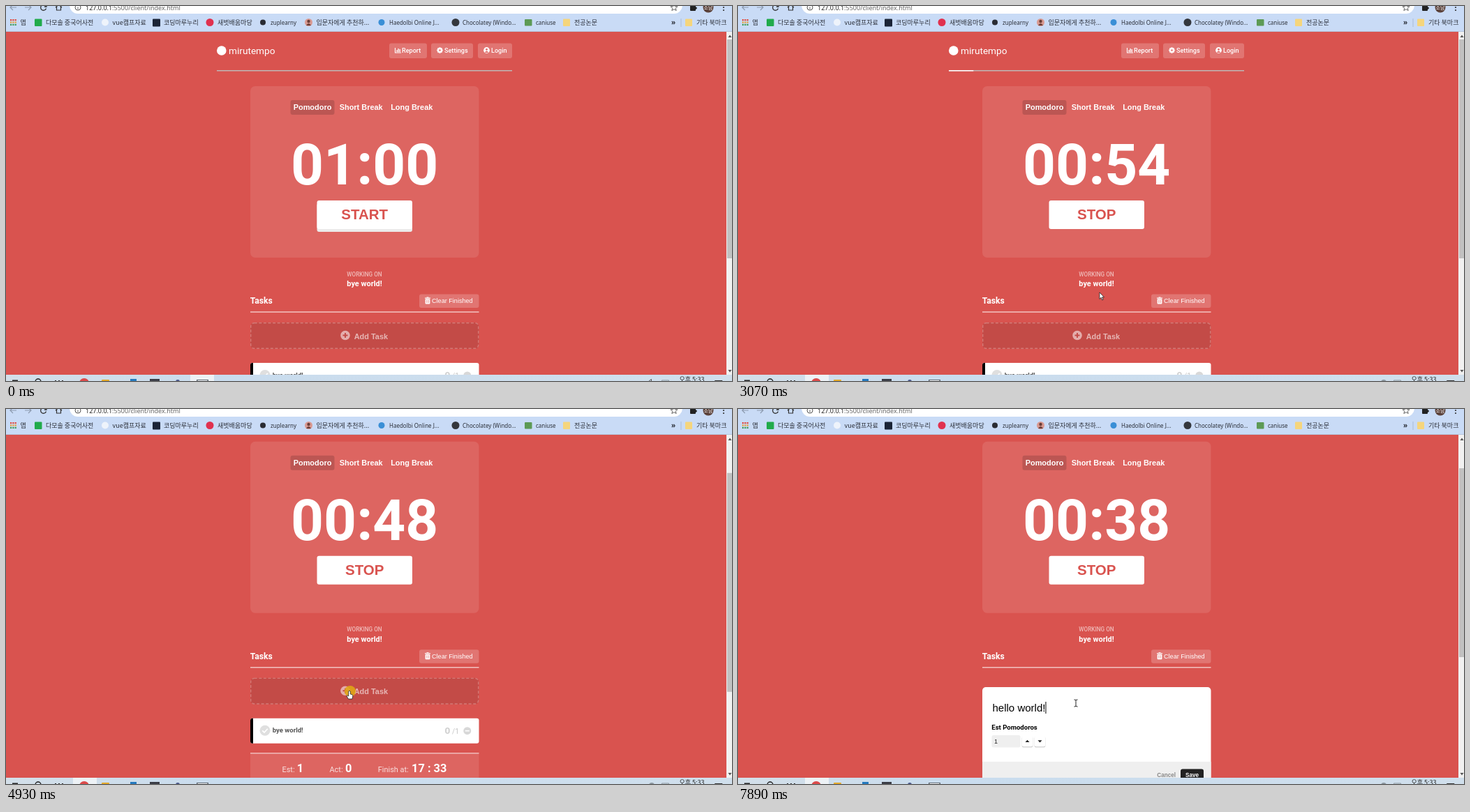
An HTML page with a canvas for the animation above (8000 ms loop, 1040x538 px).

```html
<!DOCTYPE html>
<html lang="ko">
<head>
<meta charset="utf-8">
<title>Pomodoro timer</title>
<style>
html, body { margin: 0; width: 100%; height: 100%; overflow: hidden; }
canvas { display: block; }
</style>
</head>
<body>
<canvas id="stage" width="1040" height="538"></canvas>
<script>
const ctx = document.getElementById('stage').getContext('2d');
const LOOP = 8000, RED = '#d9534f', SCROLL_END = 68.3;
const ROBOTO = 'Roboto, sans-serif', ARIAL = '"Liberation Sans", Arial, sans-serif';
const NOTO = '"Noto Sans", sans-serif', CJK = '"Noto Sans CJK KR", "Noto Sans CJK", sans-serif';
const white = a => `rgba(255,255,255,${a})`;

// Keys are [time, value, ...]; values are joined by straight lines.
const ELAPSED = [[1250, 0], [2190, 3], [3620, 8], [4590, 11], [7880, 22], [8180, 23]];
const SCROLL = [[3660, 0], [3690, 1], [3770, 26], [3860, 52.5], [3930, 63], [4020, SCROLL_END]];
const POINTER = [
  [200, 868, 483], [350, 760, 425], [520, 610, 345], [680, 525, 303], [800, 501, 294],
  [1430, 501, 294], [1660, 618.5, 329], [2380, 618.5, 329], [2560, 641, 375], [2800, 606, 422],
  [3050, 520, 412], [3220, 503, 403], [3690, 503, 403], [3860, 508.5, 397], [4100, 508.5, 397],
  [4370, 492, 404], [5200, 492, 404], [5500, 484, 424], [5790, 484, 424], [5900, 484, 422]
];
const KEYS = 'hello word\bld!';
const KEY_TIMES = [5870, 6110, 6190, 6340, 6490, 6570, 6650, 6800, 6970, 7120, 7290, 7600, 7660, 7880];

const ARROW = new Path2D('M0 0V9.5L2.2 7.4L3.8 11L5.3 10.3L3.7 6.9H6.6Z');
const HAND = new Path2D('M-1.3 1Q0-.8 1.3 1V5L4 5.8Q5 6 4.8 8L4 12H-1.5L-4.2 7.5Q-3.6 6-1.3 8Z');
const BEAM = new Path2D('M-2.5-5Q0-5 0-4Q0-5 2.5-5M0-4.5V4.5M-2.5 5Q0 5 0 4Q0 5 2.5 5');

const clamp = x => Math.max(0, Math.min(1, x));
const within = (t, a, b) => t >= a && t < b;

function track(t, keys) {
  const next = keys.findIndex(k => k[0] > t);
  if (next === 0) return keys[0].slice(1);
  if (next < 0) return keys[keys.length - 1].slice(1);
  const a = keys[next - 1], b = keys[next], p = (t - a[0]) / (b[0] - a[0]);
  return a.slice(1).map((v, i) => v + (b[i + 1] - v) * p);
}

function box(x, y, w, h, color, r = 0) {
  ctx.fillStyle = color;
  ctx.beginPath();
  ctx.roundRect(x, y, w, h, r);
  ctx.fill();
}
function dot(x, y, r, color) {
  ctx.fillStyle = color;
  ctx.beginPath();
  ctx.arc(x, y, r, 0, 7);
  ctx.fill();
}
function line(path, color, width = 1) {
  ctx.strokeStyle = color;
  ctx.lineWidth = width;
  ctx.stroke(new Path2D(path));
}
function shape(path, color) {
  ctx.fillStyle = color;
  ctx.fill(new Path2D(path));
}
function text(str, x, y, font, color = '#fff', align = 'left') {
  ctx.font = font;
  ctx.fillStyle = color;
  ctx.textAlign = align;
  ctx.fillText(str, x, y);
}

function drawBrowser() {
  box(0, 0, 1040, 37, '#c9dbf6');
  box(91, -14, 878, 25, '#fff', 12);
  box(0, 36, 1040, 1, '#b5c4dc');
  line('M15 2H6M10 -2L6 2L10 6', '#8d9bb0', 1.2);
  line('M27 2H36M32 -2L36 2L32 6', '#8d9bb0', 1.2);
  line('M57 0A4 4 0 1 0 57.5 3.5M58 -2V1H55', '#333', 1.3);
  line('M71 2L75.500 -2L80 2M72.500 1V6H78.500V1', '#333', 1.2);
  line('M99 2A4 4 0 1 0 107 2A4 4 0 1 0 99 2M103 1.500V4.500', '#555');
  text('127.0.0.1', 114, 5.5, '9px ' + NOTO, '#222');
  const host = ctx.measureText('127.0.0.1').width;
  text(':5500/client/index.html', 114 + host, 5.5, '9px ' + NOTO, '#666');
  line('M957 -3L958.300 .6L962 .8L959.200 3.100L960.200 6.500L957 4.600L953.800 6.500L954.800 3.100L952 .8L955.700 .6Z', '#555', .9);
  box(980, -1, 8, 8, '#222', 1);
  dot(984, -1, 1.8, '#222');
  dot(988, 3, 1.8, '#222');
  dot(1006, 2, 7.5, '#5c433c');
  text('소담', 1006, 5, '7px ' + CJK, '#fff', 'center');
  [-2, 2, 6].forEach(y => dot(1028, y, 1.1, '#333'));

  ['#e04a3f', '#e8a13a', '#3f9d5a'].forEach((c, i) =>
    [6, 9.3, 12.600].forEach(x => box(x, 19 + i * 3.4, 2.2, 2.2, c)));
  box(41, 18.5, 10.5, 10.5, '#21ab4b', 1);
  dot(142, 23.5, 5, '#eef3fb');
  box(210, 18.5, 11, 11, '#1b2436', 1);
  dot(292, 23.5, 5.5, '#e0314f');
  dot(368, 23.5, 4, '#2a2c33');
  dot(433.500, 23.5, 5.500, '#d99a92');
  dot(433.5, 22, 2.2, '#6b3e38');
  shape('M430 28Q433.500 22 437 28Z', '#6b3e38');
  dot(538, 23.5, 4.500, '#3a8fd6');
  dot(644, 23.5, 5.5, '#34373d');
  box(743, 19, 10.5, 9.500, '#5d9a55', 1);
  [798, 973].forEach(x => box(x, 18.5, 10, 10.5, '#f5d57c', 1));

  const korean = '9px ' + CJK, latin = '8px ' + NOTO, ink = '#2b2f38';
  [['앱', 20.5], ['다모솔 중국어사전', 57], ['vue캠프자료', 152.5], ['코딩마루누리', 226],
   ['새벗배움마당', 303], ['입문자에게 추천하...', 444.5], ['전공논문', 814], ['기타 북마크', 989]]
    .forEach(([s, x]) => text(s, x, 27, korean, ink));
  [['zuplearny', 379], ['Haedolbi Online J...', 549], ['Chocolatey (Windo...', 654], ['caniuse', 759]]
    .forEach(([s, x]) => text(s, x, 26.5, latin, ink));
  text('»', 953, 26.5, '700 10px ' + NOTO, ink);
  box(966.5, 18, 1, 12, '#a9bbd6');
}

function drawTaskbar(t) {
  const sky = ctx.createLinearGradient(0, 0, 1040, 0);
  sky.addColorStop(0, '#d3dfe9');
  sky.addColorStop(.3, '#c9dcee');
  sky.addColorStop(1, '#d0dfec');
  box(0, 529, 1040, 9, sky);
  box(t < 1360 ? 264 : 96, 529, 34, 9, '#edf2f6');
  box(9, 536.5, 8, 2, '#222');
  line('M42 539A4 4 0 0 1 50 539', '#222', 1.3);
  [70, 75, 80].forEach(x => box(x, 537, 2, 1, '#333'));
  dot(112, 541, 7, '#dc4a4a');
  box(137, 536, 11, 3, '#e3a92c', 1);
  box(178, 535, 9, 4, '#2479be');
  box(206, 535, 14, 4, '#3b3d46');
  dot(246, 539, 3, '#4a5688');
  box(273, 536, 17, 3, '#5f6871');
  box(274.5, 537, 14, 2, '#f6f8fa');
  if (t < 1500) line('M921 538L924.500 535.500V538', '#555');
  else dot(925, 540, 4, '#8a959e');
  line('M939.500 539V537H949.500V539', '#8a959e');
  text('오후 5:33', 982.5, 539, '9px ' + CJK, '#222', 'center');
  line('M1015.500 539V537.500H1026V539', '#333');
}

function drawScrollbar(scroll, formOpen) {
  box(1032, 37, 8, 492, '#f1f1f1');
  box(1033, formOpen ? 85 : 48 + scroll * .64, 7, formOpen ? 271 : 314, '#c1c1c1');
  shape('M1034.500 45L1037 41.500L1039.500 45Z', '#555');
  shape('M1034.500 522L1037 525.500L1039.500 522Z', '#555');
}

function drawHeader(bar) {
  dot(308.8, 64, 6.8, '#fff');
  text('mirutempo', 319, 69, '13.65px ' + ROBOTO);
  [[549, 54, 'Report', 567], [609, 60, 'Settings', 628], [676, 49, 'Login', 695]].forEach(([x, w, s, tx]) => {
    box(x, 53.5, w, 21.5, white(.2), 3);
    text(s, tx, 67, '500 9.1px ' + ROBOTO);
  });
  line('M557.500 60V67H566', '#fff', 1.1);
  [[559.500, 3], [561.500, 5], [563.600, 4]].forEach(([x, h]) => box(x, 66 - h, 1.3, h, '#fff'));
  for (let i = 0; i < 4; i++) {
    const a = i * Math.PI / 4, dx = 4.3 * Math.cos(a), dy = 4.3 * Math.sin(a);
    line(`M${621.5 - dx} ${63.5 - dy}L${621.5 + dx} ${63.5 + dy}`, '#fff', 2);
  }
  dot(621.5, 63.5, 3.2, '#fff');
  dot(621.5, 63.5, 1.3, '#e17572');
  dot(688.5, 63.5, 4.4, '#fff');
  dot(688.5, 62.2, 1.5, '#e17572');
  shape('M685.800 66.500Q688.500 62.500 691.200 66.500Q688.500 68 685.800 66.500Z', '#e17572');
  box(302, 92, 423, 1.5, '#bdb7b7');
  box(302, 92, bar * 423 / 60, 1.5, '#fff');
}

function drawTimer(seconds, running) {
  box(350, 115, 327.5, 246, white(.1), 7);
  box(407.5, 135, 63, 21, 'rgba(0,0,0,.15)', 3);
  [['Pomodoro', 411.700], ['Short Break', 477.700], ['Long Break', 551.2]].forEach(([s, x]) =>
    text(s, x, 149, '700 10.93px ' + ARIAL));
  const clock = [Math.floor(seconds / 60), seconds % 60].map(n => String(n).padStart(2, '0')).join(':');
  text(clock, 513.7, 256, '700 82px ' + ROBOTO, '#fff', 'center');
  if (!running) box(445.5, 283, 136.5, 41, '#ebebeb', 3);
  box(445.5, 279, 136.5, 41, '#fff', 3);
  text(running ? 'STOP' : 'START', 513.7, 306, '700 20.5px ' + ARIAL, RED, 'center');
}

function drawTasksHead() {
  text('WORKING ON', 513.5, 387.5, '500 8.2px ' + ROBOTO, white(.6), 'center');
  text('bye world!', 513.5, 402, '700 10.93px ' + ROBOTO, '#fff', 'center');
  text('Tasks', 349.7, 427, '700 12.2px ' + ROBOTO);
  box(592, 413.5, 85.5, 19.5, white(.2), 3);
  box(600, 418.5, 8, 1.2, '#fff');
  box(602.5, 417.5, 3, 1.2, '#fff');
  box(600.6, 420.3, 6.8, 7.2, '#fff', 1);
  line('M602.500 421.500V426M604 421.500V426M605.500 421.500V426', '#e17572', .5);
  text('Clear Finished', 610, 426, '9.1px ' + ARIAL);
  box(350, 438.2, 327.5, 1.5, white(.65));
}

function drawTaskList() {
  box(350, 454, 327.5, 38, 'rgba(0,0,0,.1)', 6);
  ctx.setLineDash([4, 2.6]);
  ctx.strokeStyle = white(.25);
  ctx.lineWidth = 1.4;
  ctx.beginPath();
  ctx.roundRect(350.7, 454.7, 326, 36.600, 5);
  ctx.stroke();
  ctx.setLineDash([]);
  dot(486, 472.5, 6.8, white(.55));
  line('M482.500 472.500H489.500M486 469V476', '#c34b47', 1.9);
  text('Add Task', 498.7, 477.5, '700 10.93px ' + ARIAL, white(.6));

  box(350, 512, 327.5, 36, '#fff', 3);
  box(350, 512, 4, 36, '#000', [3, 0, 0, 3]);
  dot(371, 529.5, 7.5, '#dfdfdf');
  line('M367.300 529.700L370 532.400L374.800 527', '#fff', 1.7);
  text('bye world!', 381.700, 532.5, '700 9.56px ' + ROBOTO, '#555');
  text('0', 628.5, 534, '700 13.65px ' + ROBOTO, '#cfcfcf');
  text('/1', 639, 534, '10.2px ' + ROBOTO, '#c4c4c4');
  dot(660.8, 530, 5.500, '#d8d8d8');
  box(657.8, 529.2, 6, 1.6, '#fff');

  box(350, 562, 327.5, 46, white(.1));
  box(350, 561.5, 327.5, 1.4, white(.7));
  [['Est:', 395.5, '1', 416.8], ['Act:', 463.5, '0', 486], ['Finish at:', 532.8, '17 : 33', 581]].forEach(([s, x, value, vx]) => {
    text(s, x, 589, '10.93px ' + ROBOTO, white(.8));
    text(value, vx, 589.5, '700 16.4px ' + ROBOTO);
  });
}

function typedText(t) {
  let out = '';
  KEY_TIMES.forEach((time, i) => {
    if (t >= time) out = KEYS[i] === '\b' ? out.slice(0, -1) : out + KEYS[i];
  });
  return out;
}

function drawForm(t) {
  const typed = typedText(t);
  box(350, 399, 327.5, 147, '#fff', 5);
  box(350, 506, 327.5, 40, '#efefef');
  text(typed || 'What are you working on?', 364.5, 434, '15.03px ' + ARIAL, typed ? '#000' : '#757575');
  if (typed || t < 5500) box(364.5 + (typed ? ctx.measureText(typed).width : 0), 420, 1, 17, '#000');
  text('Est Pomodoros', 363.3, 460, '700 9.56px ' + ROBOTO, '#000');
  box(363.5, 468, 41, 17.5, '#efefef', 2.5);
  text('1', 367, 480, '9.1px ' + ARIAL, '#222');
  [407, 425].forEach(x => {
    box(x - .3, 470, 15.6, 15.5, '#d0d0d0', 2);
    box(x, 469, 15, 15.3, '#fff', 2);
  });
  shape('M411.500 478L414.500 474.800L417.500 478Z', '#222');
  shape('M429.500 475.200L432.500 478.400L435.500 475.200Z', '#222');
  text('Cancel', 600.3, 527.7, '700 8.2px ' + ARIAL, '#888');
  box(634, 516.5, 33, 17, typed ? '#222' : '#a7a7a7', 3);
  text('Save', 650.5, 527.7, '700 8.2px ' + ARIAL, typed ? '#fff' : '#e6e6e6', 'center');
}

function drawPointer(t) {
  if (t < 200) return;
  const [x, y] = track(t, POINTER);
  if (within(t, 1060, 1140)) dot(501, 295, 7, 'rgba(224,165,22,.9)');
  if (within(t, 4860, 5010)) dot(493, 405, 8, 'rgba(224,165,22,.9)');
  ctx.save();
  ctx.translate(x, y);
  ctx.lineWidth = .8;
  ctx.strokeStyle = '#222';
  ctx.fillStyle = '#fff';
  if (t >= 5300) {
    ctx.lineWidth = 1;
    ctx.stroke(BEAM);
  } else {
    const cursor = within(t, 680, 1480) || within(t, 3770, 5090) ? HAND : ARROW;
    ctx.fill(cursor);
    ctx.stroke(cursor);
  }
  ctx.restore();
}

function draw(t) {
  const [elapsed] = track(t, ELAPSED), [scroll] = track(t, SCROLL);
  const ticks = Math.floor(elapsed);
  // The bar follows each tick with a short delay.
  const bar = Math.max(0, ticks - 1 + clamp((elapsed - ticks - .1) * 8));
  const formOpen = t >= 5090;

  box(0, 0, 1040, 538, RED);
  ctx.save();
  ctx.translate(0, -scroll);
  drawHeader(bar);
  drawTimer(60 - ticks, t >= 1360);
  drawTasksHead();
  if (!formOpen) drawTaskList();
  ctx.restore();
  if (formOpen) drawForm(t);
  drawScrollbar(scroll, formOpen);
  drawBrowser();
  drawTaskbar(t);
  drawPointer(t);
}

function frame() {
  draw(performance.now() % LOOP);
  requestAnimationFrame(frame);
}
frame();
</script>
</body>
</html>
```
